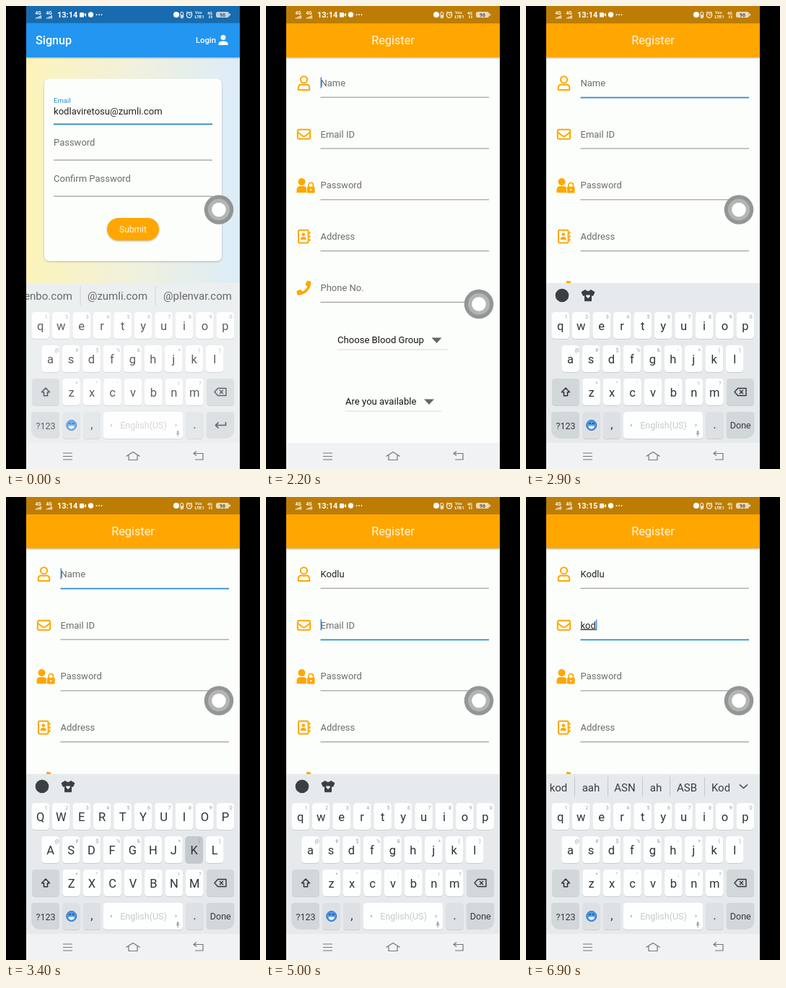
An HTML page for the animation above (7 s loop, 352 by 640 pixels).

```html
<!DOCTYPE html>
<html lang="en">
<head>
<meta charset="utf-8">
<title>Signup and register</title>
<style>
html, body { margin: 0; width: 100%; height: 100%; overflow: hidden; background: #000; }
svg { display: block; width: 352px; height: 640px; }
text { font-family: Roboto, "Open Sans", sans-serif; white-space: pre; }
.mid { text-anchor: middle; }
.upper .letter { text-transform: uppercase; }
.down { fill: #c3c9cd; }
</style>
</head>
<body>
<svg id="stage" viewBox="0 0 352 640"></svg>
<script>
const LOOP = 7000;
const ORANGE = '#ffa700';
const MAIL = 'kodlaviretosu@zumli.com';

const text = (x, y, size, fill, str, extra = '') =>
  `<text x="${x}" y="${y}" font-size="${size}" fill="${fill}" ${extra}>${str}</text>`;
const mid = (x, y, size, fill, str, extra = '') => text(x, y, size, fill, str, 'class="mid" ' + extra);
const rect = (x, y, w, h, fill, r = 0, extra = '') =>
  `<rect x="${x}" y="${y}" width="${w}" height="${h}" rx="${r}" fill="${fill}" ${extra}/>`;
const disc = (x, y, r, fill, extra = '') => `<circle cx="${x}" cy="${y}" r="${r}" fill="${fill}" ${extra}/>`;
const fillPath = (d, fill, extra = '') => `<path d="${d}" fill="${fill}" ${extra}/>`;
const line = (d, color, w = 1, extra = '') =>
  `<path d="${d}" fill="none" stroke="${color}" stroke-width="${w}" ${extra}/>`;
const group = (id, body) => `<g id="${id}">${body}</g>`;

function signalBars(x) {
  let s = text(x, 11.5, 6.5, '#fff', '4G', 'font-weight="700"');
  for (let i = 0; i < 4; i++) s += rect(x + 0.5 + i * 2.2, 16 - i, 1.3, 1.5 + i, '#fff');
  return s;
}

function statusBar() {
  return signalBars(40.5) + signalBars(55.5) +
    text(71, 16, 11, '#fff', '13:14', 'id="clock" font-weight="700"') +
    rect(102, 9, 6, 6.5, '#fff', 1) + fillPath('M108 12l3-2.5v5.5z', '#fff') +
    disc(117.5, 12, 3.7, '#fff') +
    [125.5, 129, 132.5].map(x => disc(x, 12, 0.9, '#fff')).join('') +
    disc(236, 12, 4, '#fff') +
    rect(242, 8.5, 3.6, 8, 'none', 1, 'stroke="#fff"') + rect(243, 12.5, 1.8, 3, '#fff') +
    disc(254, 12.5, 3.6, 'none', 'stroke="#fff" stroke-width="1.2"') +
    line('M254 10.5v2h1.8M249.8 9.5l2-1.8M258.2 9.5l-2-1.8', '#fff') +
    text(262, 11, 5.5, '#fff', 'Voo', 'font-weight="500"') +
    text(261.5, 17, 6, '#fff', 'LTE1', 'font-weight="700"') +
    text(279, 12, 5.5, '#fff', '4G', 'font-weight="700"') +
    line('M282 13v4M285 13v4', '#fff', 1.1) +
    rect(291, 8, 18, 8, '#fff', 2.5, 'fill-opacity=".7"') + rect(309.5, 10.5, 1.3, 3, '#fff') +
    mid(300, 14.6, 7, '#555', '96', 'font-weight="700"');
}

function signup() {
  const label = (y, s) => text(66, y, 13, '#6b6d6c', s) + rect(66, y + 19.5, 220, 1, '#858786');
  return rect(28, 71, 296, 533, 'url(#dawn)') +
    rect(28, 0, 296, 24, '#186bae') + rect(28, 24, 296, 47, '#2196f0', 0, 'filter="url(#soft)"') +
    rect(28, 23, 296, 1, '#1b7bc8') +
    text(41, 53, 16.2, '#fff', 'Signup', 'font-weight="500"') +
    text(263, 51, 11.2, '#fff', 'Login', 'font-weight="500"') +
    disc(301, 43.5, 3.5, '#fff') + fillPath('M294.5 54v-2q0-3.6 6.5-3.6t6.5 3.6v2z', '#fff') +
    rect(53, 100.5, 246, 252, '#fcfefc', 7, 'filter="url(#soft)"') +
    text(66, 134, 9.6, '#2b90cf', 'Email') +
    text(66, 150, 13.1, '#222', MAIL) + rect(66, 162.5, 220, 1.8, '#2a86b6') +
    label(193, 'Password') + label(243, 'Confirm Password') +
    rect(140, 293, 72, 31, ORANGE, 15.5, 'filter="url(#soft)"') +
    mid(176, 313, 12, '#fff8e6', 'Submit');
}

const rowY = i => 106 + 70.8 * i;

function icons() {
  const user = disc(52.5, 101.8, 4.6, 'none', `stroke="${ORANGE}" stroke-width="2"`) +
    line('M44.8 116v-3q0-4.6 4.6-4.6 3.1 1.2 6.2 0 4.6 0 4.6 4.6v3z', ORANGE, 2, 'stroke-linejoin="round"');
  const mail = rect(43.8, 170.8, 17.4, 13, 'none', 2, `stroke="${ORANGE}" stroke-width="2"`) +
    line('M44 174.5l6.5 5q2 1.5 4 0l6.5-5', ORANGE, 2);
  const lock = disc(49.5, 243, 5, ORANGE) +
    fillPath('M42.5 258v-3.5q0-5.5 5-5.5h4q3 0 4.5 2v7z', ORANGE) +
    rect(56.8, 249.8, 10.8, 8.6, ORANGE, 1.2) +
    line('M59 250v-2.5a3.2 3.2 0 0 1 6.4 0v2.5', ORANGE, 1.7) + disc(62.2, 254, 1.2, '#fff');
  const book = rect(45, 309.8, 13.6, 17.6, 'none', 1.8, `stroke="${ORANGE}" stroke-width="2"`) +
    disc(51.8, 315.8, 2.3, ORANGE) + fillPath('M47.8 323v-1q0-3 4-3t4 3v1z', ORANGE) +
    line('M60.5 312v3M60.5 317v3M60.5 322v3', ORANGE, 1.8);
  const phone = fillPath('M493 25l-104-24c-11-3-23 3-27 14l-48 112c-4 10-1 21 7 28l60 49c-36 77-99 141-177 178l-49-61c-7-8-18-11-28-7l-112 48C4 366-2 378 1 389l24 104c2 11 12 19 23 19 256 0 464-208 464-464 0-11-8-21-19-23z',
    ORANGE, 'transform="translate(42.5 379.8) scale(.0388)"');
  return user + mail + lock + book + phone;
}

function dropdown(x, y, w, tip, str) {
  return text(x, y, 13.1, '#161616', str) +
    fillPath(`M${tip} ${y - 7.5}h14l-7 7.5z`, '#666') + rect(x - 0.5, y + 8.5, w, 1, '#dcdedc');
}

function register() {
  const labels = ['Name', 'Email ID', 'Password', 'Address', 'Phone No.'];
  return rect(28, 71, 296, 533, '#fcfefb') +
    rect(28, 0, 296, 24, '#bd7d05') + rect(28, 24, 296, 47, ORANGE, 0, 'filter="url(#soft)"') +
    mid(176, 53, 16.3, '#fff6df', 'Register') + icons() +
    labels.map((s, i) => text(75.5, rowY(i) + 4.8, 13, '#6c6e6c', s, `id="field${i}"`) +
      rect(75.5, rowY(i) + 19.7, 233.5, 1, '#8c8e8c', 0, `id="rule${i}"`)).join('') +
    rect(75.5, 0, 1.4, 15, '#3b7fd6', 0, 'id="cursor"') +
    dropdown(99, 466, 154, 229.5, 'Choose Blood Group') +
    dropdown(110, 551, 134, 219, 'Are you available');
}

const key = (cx, y, w, fill, id = '') =>
  rect(cx - w / 2, y + 1, w, 37, '#c9ced1', 4.5) + rect(cx - w / 2, y, w, 37, fill, 4.5, id && `id="key-${id}"`);

function letterRow(x, y, letters, hints) {
  return [...letters].map((c, i) => {
    const cx = x + 28.45 * i;
    return key(cx, y, 24.6, '#fdfefe', c) +
      text(cx + 6, y + 8.5, 7, '#9a9fa3', hints[i]) +
      `<text x="${cx}" y="${y + 24.5}" font-size="16.5" fill="#2f3336" class="mid letter">${c}</text>`;
  }).join('');
}

// strips are [words with centres, separators]
const strips = {
  mail: [[['enbo.com', 58.5], ['@zumli.com', 154.5], ['@plenvar.com', 265.5]], [102.5, 206.5]],
  k: [[['K', 47], ['Know', 99], ['Keep', 170], ['Kind', 244]], [71, 126, 215, 274]],
  ko: [[['Ko', 47], ['So', 99], ['Kodla', 170], ['Go', 244]], [71, 126, 215, 274]],
  kodl: [[['Kodl', 47], ['Wish', 99], ['Kodlavire', 170], ['Kodla', 244]], [71, 126, 215, 274]],
  kodlu: [[['Kodlu', 52], ['Kodla', 113], ['Kodlavire', 185], ['Wish', 249]], [80, 145, 225, 274]],
  a: [[['k', 45], ['a', 90], ['I', 137], ['ah', 180], ['As', 223], ['K', 262]], [67, 113, 161, 199, 247]],
  kod: [[['kod', 45], ['aah', 90], ['ASN', 137], ['ah', 180], ['ASB', 223], ['Kod', 270]], [67, 113, 161, 199, 247]]
};

function strip(name) {
  const [words, seps] = strips[name];
  const more = name === 'mail' ? '' : rect(282, 385, 42, 32, '#e7eaec') + line('M296 397.5l5.5 5 5.5-5', '#444', 1.6);
  return words.map(([s, x]) => mid(x, name === 'mail' ? 406 : 407, 15, '#3a3e41', s)).join('') +
    seps.map(x => rect(x, 387, 1, 27, '#c3c7ca')).join('') + more;
}

function toolbar() {
  return disc(50, 400, 9.3, '#3b3f42') +
    fillPath('M82 392.5q4 4 8 0l5 3-2.3 5-2.2-.8v8h-9v-8l-2.2.8-2.3-5z', '#3b3f42', 'stroke="#3b3f42" stroke-linejoin="round"') +
    fillPath('M86 404l-2.6-2.6q-.8-2 1-2.2 1 0 1.6 1 .6-1 1.6-1 1.8.2 1 2.2z', '#fff');
}

function keyboard() {
  const grey = '#d2d7da', pale = '#dde1e4', ink = '#33373a';
  const corner = (x, left) => fillPath(left
    ? `M${x + 4} 561h30q4.500 0 4.500 4.500v28q0 4.500-4.500 4.500h-20q-14.500 0-14.500-14.500v-18q0-4.500 4.500-4.500z`
    : `M${x + 4} 561h30q4.500 0 4.500 4.500v18q0 14.500-14.500 14.500h-20q-4.500 0-4.500-4.500v-28q0-4.500 4.500-4.500z`, grey);
  return rect(28, 383, 296, 222, '#e7eaec') + group('tools', toolbar()) +
    Object.keys(strips).map(n => group('strip-' + n, strip(n))).join('') +
    letterRow(47.8, 423, 'qwertyuiop', '1234567890') +
    letterRow(61.6, 469, 'asdfghjkl', '@#$%&-+()').replace('>&<', '>&amp;<') +
    letterRow(90.6, 515, 'zxcvbnm', '*"\':;!?') +
    key(55, 515, 38, grey, 'shift') +
    line('M55 528l-5.500 5.800h3v5h5v-5h3z', ink, 1.6, 'stroke-linejoin="round"') +
    key(297, 515, 38, grey) +
    line('M289 533.500l4.500-5h11.500v10h-11.500z M296 531l5 5m0-5l-5 5', ink, 1.4, 'stroke-linejoin="round"') +
    corner(35.5, true) + mid(55, 584.5, 12.5, ink, '?123') +
    key(90.7, 561, 24, pale) + disc(90.7, 579.5, 7, '#4e9bee', 'stroke="#2866b5"') +
    line('M86.800 577.500q1.400-1.800 2.800 0M91.800 577.500q1.400-1.800 2.800 0', '#173d74', 1.2) +
    fillPath('M86.500 580.500h8.400q-.8 4-4.200 4t-4.200-4z', '#fff') +
    key(119, 561, 24, pale) + mid(119, 584, 17, ink, ',') +
    key(190, 561, 110, '#fdfefe') + mid(190.5, 584, 12.5, '#c6cacd', 'English(US)') +
    fillPath('M147 577v5l-3-2.500zM234.500 577v5l3-2.500z', '#c6cacd') +
    rect(236.8, 587, 2.6, 5, '#9ea3a7', 1.3) + line('M235.500 590.500q2.600 4.500 5.200 0M238.100 593v2.500', '#9ea3a7', 0.9) +
    key(261.5, 561, 24, pale) + mid(261.5, 584, 17, ink, '.') +
    corner(278, false) +
    group('enter', line('M304.500 575v4.500h-14m4-4l-4 4 4 4', ink, 1.6)) +
    group('done', mid(297.3, 584.3, 12.5, ink, 'Done')) +
    rect(28, 383, 296, 221, '#fff', 0, 'id="haze"');
}

function navBar() {
  return rect(28, 604, 296, 36, '#f1f2f3') +
    line('M79 618h13M79 622.500h13M79 627h13', '#777', 1.2) +
    line('M166.500 622.500l9.500-6 9.500 6M170 621v6.500h12v-6.500', '#777', 1.2) +
    line('M264 615.500l-4 3 4 3M260 618.500h13v8.500h-11', '#777', 1.2);
}

document.getElementById('stage').innerHTML = `<defs>
  <linearGradient id="dawn"><stop offset="0" stop-color="#fdf4ba"/><stop offset=".5" stop-color="#f1f1dd"/>
  <stop offset="1" stop-color="#dcecf8"/></linearGradient>
  <filter id="soft" x="-10%" y="-10%" width="120%" height="130%">
  <feDropShadow dx="0" dy="1" stdDeviation="1.2" flood-opacity=".3"/></filter>
  <clipPath id="screen"><rect x="28" width="296" height="640"/></clipPath></defs>
  <rect width="352" height="640"/><g clip-path="url(#screen)">` +
  group('signup', signup()) + group('register', register()) + statusBar() +
  group('keyboard', keyboard()) + navBar() +
  group('ball', disc(295, 281.5, 20.3, '#8b8e8d', 'fill-opacity=".92"') +
    disc(295, 281.5, 15, '#b2b5b4') + disc(295, 281.5, 9.8, '#fff')) + '</g>';

const get = id => document.getElementById(id);
const show = (id, on) => get(id).setAttribute('display', on ? 'inline' : 'none');

// latest entry at or before t
const at = (steps, t) => steps.reduce((v, [start, value]) => (t >= start ? value : v), steps[0][1]);

const drop = [[0, 0], [2200, 222], [2300, 150], [2400, 45], [2500, 0]];
const ballDrop = [[0, 0], [2200, 130.5], [2300, 110], [2400, 30], [2500, 0]];
const nameSteps = [[0, ''], [3500, 'K'], [3700, 'Ko'], [3800, 'Kod'], [3900, 'Kodl'], [4400, 'Kodlu']];
const mailSteps = [[0, ''], [5800, 'k'], [6600, 'ko'], [6800, 'kod']];
const stripSteps = [[0, 'mail'], [2200, ''], [3500, 'k'], [3700, 'ko'], [3900, 'kodl'], [4500, 'kodlu'],
  [4800, ''], [5900, 'a'], [6900, 'kod']];
const pressSteps = [[0, ''], [3000, 'shift'], [3100, ''], [3400, 'k'], [3500, ''], [3600, 'o'], [3700, ''],
  [3800, 'l'], [3900, ''], [4300, 'u'], [4400, ''], [5700, 'k'], [5800, ''], [6500, 'o'], [6600, '']];
const cursorSteps = [[0, 0], [2200, 1], [2700, 0], [3200, 1], [5200, 0], [5700, 1]];

function setField(i, value, hint, active) {
  const f = get('field' + i), rule = get('rule' + i);
  f.textContent = value || hint;
  f.setAttribute('fill', value ? '#222' : '#6c6e6c');
  f.setAttribute('text-decoration', value && active ? 'underline' : 'none');
  rule.setAttribute('fill', active ? '#2c8fd6' : '#8c8e8c');
  rule.setAttribute('height', active ? 1.8 : 1);
  return value ? f.getComputedTextLength() : 0;
}

let drawn = -1, pressed = '';

function render(t) {
  const first = t < 2200, onMail = t >= 4800;
  show('signup', first);
  show('register', !first);
  show('enter', first);
  show('done', !first);
  get('clock').textContent = t < 5500 ? '13:14' : '13:15';
  get('keyboard').setAttribute('transform', `translate(0 ${at(drop, t)})`);
  get('ball').setAttribute('transform', `translate(0 ${at(ballDrop, t)})`);
  get('haze').setAttribute('opacity', 0.22 * Math.max(0, 1 - t / 800));
  get('keyboard').setAttribute('class', t >= 3000 && t < 3500 ? 'upper' : '');

  const nameWidth = setField(0, at(nameSteps, t), 'Name', t >= 2300 && !onMail);
  const mailWidth = setField(1, at(mailSteps, t), 'Email ID', onMail);
  get('cursor').setAttribute('x', 75.6 + (onMail ? mailWidth : nameWidth));
  get('cursor').setAttribute('y', rowY(onMail ? 1 : 0) - 7.5);
  show('cursor', at(cursorSteps, t));

  const current = at(stripSteps, t);
  show('tools', !current);
  for (const n in strips) show('strip-' + n, n === current);

  if (pressed) get('key-' + pressed).classList.remove('down');
  pressed = at(pressSteps, t);
  if (pressed) get('key-' + pressed).classList.add('down');
}

function tick() {
  const t = Math.floor(performance.now() % LOOP / 100) * 100;
  if (t !== drawn) render(drawn = t);
  requestAnimationFrame(tick);
}
tick();
</script>
</body>
</html>
```
